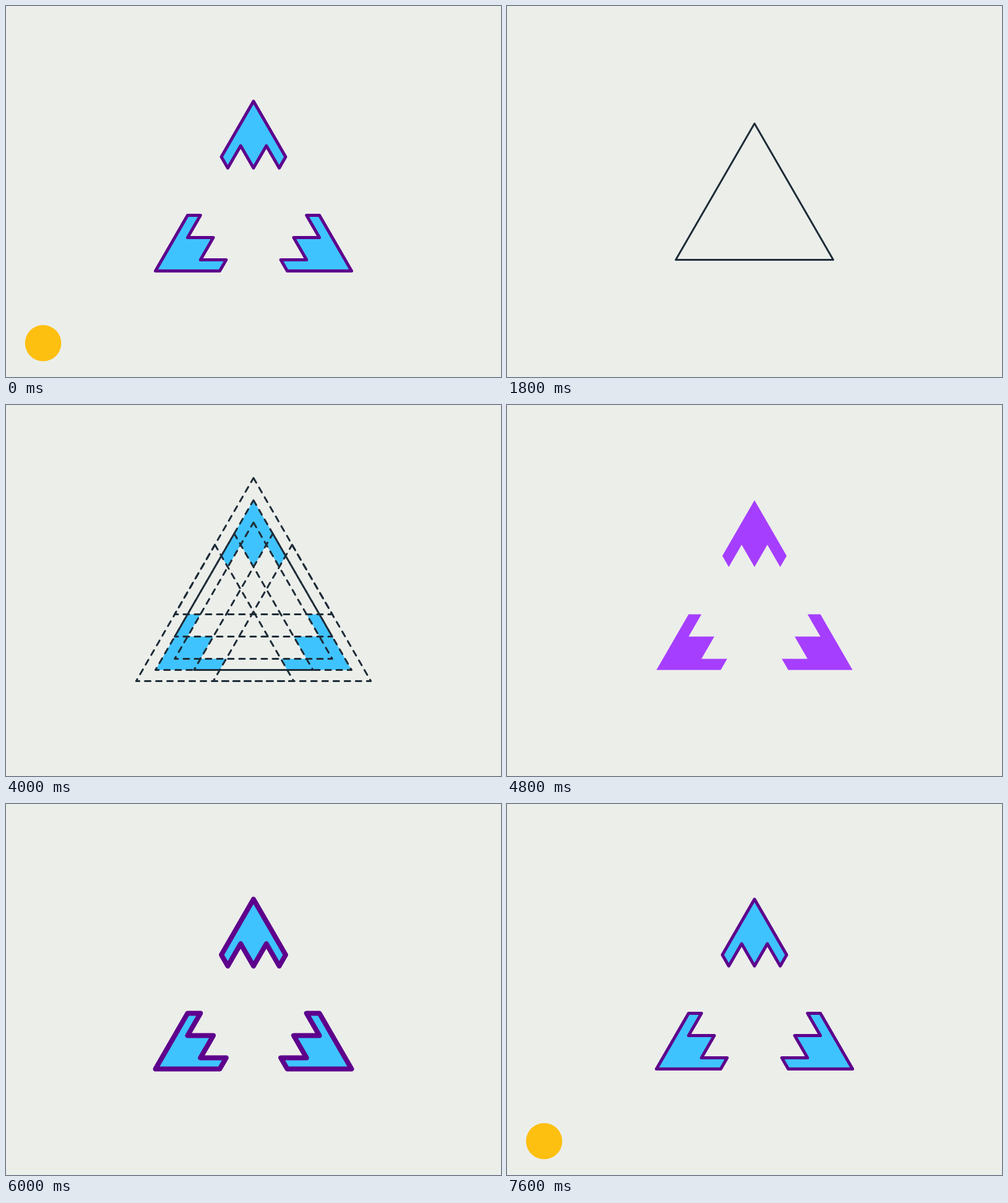
These frames come from a looping animation (800x600 px, 9100 ms). An HTML page with a canvas:

```html
<!DOCTYPE html>
<html lang="en">
<head>
<meta charset="utf-8">
<title>Triangle construction</title>
<style>
  html, body { margin: 0; width: 100%; height: 100%; overflow: hidden; background: #eceeea; }
  canvas { display: block; width: 800px; height: 600px; }
</style>
</head>
<body>
<canvas id="stage" width="800" height="600"></canvas>
<script>
const ctx = document.getElementById('stage').getContext('2d');
const LOOP = 9100;
const BG = '#eceeea', INK = '#1f2d38', BLUE = '#3fc3ff';
const VIOLET = '#a63eff', PLUM = '#5e008c', GOLD = '#fdbf10';
const CX = 400, CY = 337, RADIUS = 147, STEP = 36;
const TURN = Math.PI * 2 / 3;

// Top piece around the centre; the other two are turned copies.
const S = STEP / Math.sqrt(3);
const PIECE = [
  [0, -183], [2.5 * S, -93], [2 * S, -75], [S, -111],
  [0, -75], [-S, -111], [-2 * S, -75], [-2.5 * S, -93]
];

// Each step starts at a time and lasts until the next one.
// guides: triangles shown; fill, line, width: the three pieces.
const STEPS = [
  { at: 0, fill: BLUE, line: PLUM, width: 5, badge: true },
  { at: 950 },
  { at: 1450, guides: 1, solid: true },
  { at: 2150, guides: 1 },
  { at: 2500, guides: 2 },
  { at: 2850, guides: 3 },
  { at: 3200, guides: 5 },
  { at: 3600, guides: 7 },
  { at: 4000, guides: 7, fill: BLUE },
  { at: 4400, fill: BLUE },
  { at: 4800, fill: VIOLET },
  { at: 5200, fill: BLUE },
  { at: 5600, guides: 7, fill: BLUE },
  { at: 6000, fill: BLUE, line: PLUM, width: 8 },
  { at: 6400, fill: BLUE },
  { at: 6800, fill: BLUE, line: PLUM, width: 5 },
  { at: 7200, guides: 7, fill: BLUE, line: PLUM, width: 5 },
  { at: 7600, fill: BLUE, line: PLUM, width: 5, badge: true }
];

// Shifts as [corner, distance]; corner 0 is the top, then clockwise.
const GUIDES = [[0, 0], [0, 1], [0, 2], [1, 1], [2, 1], [1, 2], [2, 2]];

function toward(corner, distance) {
  const a = corner * TURN;
  return [Math.sin(a) * distance, -Math.cos(a) * distance];
}

function trace(points) {
  ctx.beginPath();
  for (const [x, y] of points) ctx.lineTo(x, y);
  ctx.closePath();
}

function drawGuide([corner, distance], solid) {
  const [dx, dy] = toward(corner, distance * STEP);
  trace([0, 1, 2].map(i => {
    const [x, y] = toward(i, RADIUS);
    return [CX + dx + x, CY + dy + y];
  }));
  ctx.setLineDash(solid ? [] : [9, 9]);
  ctx.strokeStyle = INK;
  ctx.lineWidth = 3;
  ctx.stroke();
  ctx.setLineDash([]);
}

function drawPiece(turn, step) {
  ctx.save();
  ctx.translate(CX, CY);
  ctx.rotate(turn * TURN);
  trace(PIECE);
  ctx.fillStyle = step.fill;
  ctx.fill();
  if (step.line) {
    ctx.strokeStyle = step.line;
    ctx.lineWidth = step.width;
    ctx.stroke();
  }
  ctx.restore();
}

function draw(t) {
  const step = STEPS.findLast(s => s.at <= t);
  ctx.fillStyle = BG;
  ctx.fillRect(0, 0, 800, 600);
  ctx.lineJoin = ctx.lineCap = 'round';
  if (step.fill) for (let i = 0; i < 3; i++) drawPiece(i, step);
  for (const guide of GUIDES.slice(0, step.guides || 0)) drawGuide(guide, step.solid);
  if (step.badge) {
    ctx.beginPath();
    ctx.arc(60, 545.3, 29.3, 0, Math.PI * 2);
    ctx.fillStyle = GOLD;
    ctx.fill();
  }
}

const start = performance.now();
function tick() {
  draw((performance.now() - start) % LOOP);
  requestAnimationFrame(tick);
}
tick();
</script>
</body>
</html>
```
